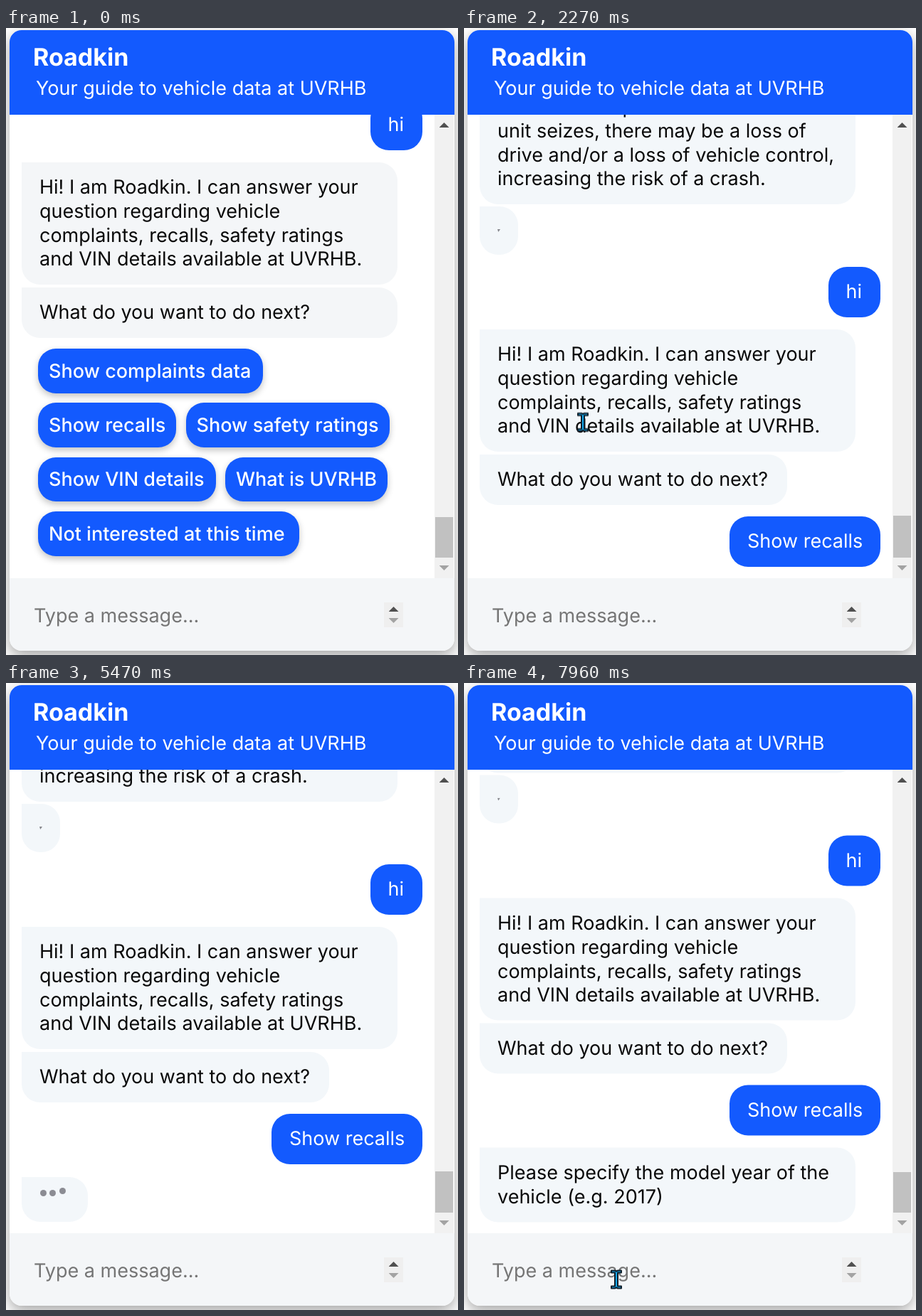
Recreate the animation shown at these times as an HTML page. Size 635x882 px, loop 8 s.

```html
<!DOCTYPE html>
<html lang="en">
<head>
<meta charset="utf-8">
<title>Chat</title>
<style>
  :root { --blue: #135afe; --loop: 8s step-end infinite; }
  html, body { margin: 0; width: 100%; height: 100%; overflow: hidden; background: #fff; }
  body { position: relative; font: 400 27px/33.8px Inter, sans-serif; font-optical-sizing: none; text-rendering: geometricPrecision; color: #080808; }
  div, svg { position: absolute; box-sizing: border-box; white-space: pre; }
  .stage { left: 0; top: 0; width: 635px; height: 882px; overflow: hidden; }
  .box { left: var(--x); top: var(--y); width: var(--w); height: var(--h); }

  .card { left: 5px; top: 3px; width: 625px; height: 873px; border-radius: 17px; background: #fff; box-shadow: 0 7px 20px rgba(0,0,0,.36); }
  .head { left: 5px; top: 3px; width: 625px; height: 119px; border-radius: 17px 17px 0 0; background: var(--blue); color: #fff; }
  .head div { left: 37px; top: 65px; }
  .head .title { left: 33px; top: 22px; font-size: 34px; font-weight: 700; }
  .foot { left: 5px; top: 774px; width: 625px; height: 102px; border-radius: 0 0 17px 17px; background: #f4f6f8; }
  .hint { left: 39px; top: 810px; color: #757575; }

  .view { left: 5px; top: 122px; width: 597px; height: 652px; overflow: hidden; }
  .log, .menu { left: -5px; top: -122px; width: 635px; height: 900px; }
  .log { animation: log var(--loop); }
  .msg { padding: 18px 25px; border-radius: 0 26px 26px 26px; background: var(--bub); }
  .user { border-radius: 26px; background: var(--blue); color: #fff; }
  .mark { width: 4px; height: 4px; left: 25px; top: 32px; background: #85868c; clip-path: polygon(0 0, 100% 0, 30% 100%); }
  @keyframes log {
    0% { transform: translateY(-235px); --bub: #f4f6f8; --ask: 528px; }
    28.375% { transform: none; --bub: #f3f7fa; --ask: 432px; }
    53.5% { transform: translateY(-81px); --bub: #f3f7fa; --ask: 432px; }
    75.25%, 100% { transform: translateY(-121.5px); --bub: #f3f7fa; --ask: 432px; }
  }

  .menu { animation: menu var(--loop); }
  .picked { animation: picked var(--loop); }
  .typing { animation: typing var(--loop); }
  .reply { animation: reply var(--loop); }
  @keyframes menu { 0% { visibility: visible } 28.375%, 100% { visibility: hidden } }
  @keyframes picked { 0% { visibility: hidden } 28.375%, 100% { visibility: visible } }
  @keyframes typing { 0%, 75.25%, 100% { visibility: hidden } 53.5% { visibility: visible } }
  @keyframes reply { 0% { visibility: hidden } 75.25%, 100% { visibility: visible } }

  .btn { height: 62.5px; padding: 14.5px 15px; border-radius: 25px; background: var(--blue); color: #fff; font-weight: 500; box-shadow: 0 4px 10px rgba(0,0,0,.24); }
  .about { animation: about var(--loop); }
  .recalls { animation: recalls var(--loop); }
  @keyframes about { 0%, 18.125%, 100% { transform: none } 16.5% { transform: translateY(2px) } }
  @keyframes recalls { 0%, 28.375%, 100% { transform: none } 19% { transform: translateY(2px) } }

  .dot { top: 18.5px; width: 9px; height: 9px; border-radius: 50%; background: #8b8c93; animation: wave 1.6s linear var(--d) infinite; }
  @keyframes wave { 0%, 60%, 100% { transform: none } 30% { transform: translateY(-8.5px) } }

  .bar { left: 602px; top: 122px; width: 27px; height: 652px; background: #f1f1f1; }
  .thumb { left: 603px; top: 688px; width: 25px; height: 57px; background: #c1c1c1; animation: thumb var(--loop); }
  @keyframes thumb {
    0%, 75.25%, 100% { top: 688px; height: 57px }
    28.375% { top: 686px; height: 59px }
    53.5% { top: 687px; height: 58px }
  }
  .spin { left: 531px; top: 808px; width: 27px; height: 35px; background: #efefef; }
  .tri { left: var(--x); top: var(--y); width: 14px; height: 7px; background: #505050; clip-path: polygon(50% 0, 100% 100%, 0 100%); }
  .down { background: #a3a3a3; clip-path: polygon(0 0, 100% 0, 50% 100%); }
  .caret { left: 39px; top: 810px; width: 2px; height: 33px; background: #000; animation: caret var(--loop); }
  @keyframes caret { 0%, 99.5%, 100% { visibility: hidden } 93.625% { visibility: visible } }

  svg { left: 0; top: 0; width: 1px; height: 1px; overflow: visible; }
  svg path { fill: #12a8ee; stroke: #10202c; stroke-width: 1.5; stroke-linejoin: round; }
  .arrow { animation: arrow var(--loop); }
  .beam { animation: beam var(--loop); }
  .beam path { stroke-width: 2; }
  @keyframes arrow {
    0%, 19%, 31.625%, 100% { visibility: hidden; transform: none }
    15.625% { visibility: visible; transform: translate(428px, 772px) }
    16.5% { visibility: visible; transform: translate(352px, 668px) }
    17.375% { visibility: visible; transform: translate(299px, 620px) }
    18.125% { visibility: visible; transform: translate(266px, 597px) }
    30.875% { visibility: visible; transform: translate(241px, 696px) }
  }
  @keyframes beam {
    0%, 30.875% { visibility: hidden; transform: none }
    19% { visibility: visible; transform: translate(226px, 580px) }
    19.875% { visibility: visible; transform: translate(202px, 570px) }
    20.75% { visibility: visible; transform: translate(186px, 563px) }
    21.5% { visibility: visible; transform: translate(176px, 558px) }
    22.5% { visibility: visible; transform: translate(170px, 556px) }
    23.375% { visibility: visible; transform: translate(167px, 554.5px) }
    86.25% { visibility: visible; transform: translate(239px, 876px) }
    87.125% { visibility: visible; transform: translate(234px, 867px) }
    88% { visibility: visible; transform: translate(228px, 857px) }
    88.875% { visibility: visible; transform: translate(222px, 849px) }
    89.875% { visibility: visible; transform: translate(218px, 844px) }
    90.75% { visibility: visible; transform: translate(215px, 841px) }
    91.625%, 100% { visibility: visible; transform: translate(214px, 839px) }
  }
</style>
</head>
<body>
<div class="stage">
  <div class="card"></div>
  <div class="head"><div class="title">Roadkin</div><div>Your guide to vehicle data at UVRHB</div></div>
  <div class="foot"></div>

  <div class="view">
    <div class="log">
      <div class="msg box" style="--x:22px;--y:76px;--w:528px;--h:172px">If the internal parts of the drive
unit seizes, there may be a loss of
drive and/or a loss of vehicle control,
increasing the risk of a crash.</div>
      <div class="msg box" style="--x:22px;--y:251px;--w:53.5px;--h:68px"><div class="mark"></div></div>
      <div class="msg user box" style="--x:511.5px;--y:336px;--w:73px;--h:71px">hi</div>
      <div class="msg box" style="--x:22px;--y:424px;--w:528px;--h:172px">Hi! I am Roadkin. I can answer your
question regarding vehicle
complaints, recalls, safety ratings
and VIN details available at UVRHB.</div>
      <div class="msg box" style="--x:22px;--y:599.5px;--w:var(--ask);--h:71px">What do you want to do next?</div>
      <div class="msg user picked box" style="--x:373px;--y:687.3px;--w:211.5px;--h:71px">Show recalls</div>
      <div class="msg typing box" style="--x:22px;--y:775.5px;--w:93px;--h:63.5px">
        <div class="dot" style="left:25.5px;--d:-.52s"></div>
        <div class="dot" style="left:39px;--d:-.32s"></div>
        <div class="dot" style="left:52.5px;--d:-.12s"></div>
      </div>
      <div class="msg reply box" style="--x:22px;--y:775.3px;--w:528px;--h:104.5px">Please specify the model year of the
vehicle (e.g. 2017)</div>
    </div>
    <div class="menu">
      <div class="btn box" style="--x:45px;--y:451px;--w:315.5px">Show complaints data</div>
      <div class="btn recalls box" style="--x:45px;--y:527.3px;--w:194px">Show recalls</div>
      <div class="btn box" style="--x:252.5px;--y:527.3px;--w:286.5px">Show safety ratings</div>
      <div class="btn box" style="--x:45px;--y:603.7px;--w:249.5px">Show VIN details</div>
      <div class="btn about box" style="--x:308px;--y:603.7px;--w:227.5px">What is UVRHB</div>
      <div class="btn box" style="--x:45px;--y:680px;--w:367px">Not interested at this time</div>
    </div>
  </div>

  <div class="bar"></div>
  <div class="thumb"></div>
  <div class="tri" style="--x:608.5px;--y:133px"></div>
  <div class="tri down" style="--x:608.5px;--y:756px"></div>

  <div class="hint">Type a message...</div>
  <div class="spin"></div>
  <div class="tri" style="--x:537.5px;--y:814px"></div>
  <div class="tri down" style="--x:537.5px;--y:830px"></div>
  <div class="caret"></div>

  <svg class="arrow"><path d="M0 0V23L5 19 9 28 13 26 9.500 17.500 17 17Z"/></svg>
  <svg class="beam"><path d="M-7-12.500H-2L0-11.500 2-12.500H7V-9.500H2V9.500H7V12.500H2L0 11.500-2 12.500H-7V9.500H-2V-9.500H-7Z"/></svg>
</div>
</body>
</html>
```
